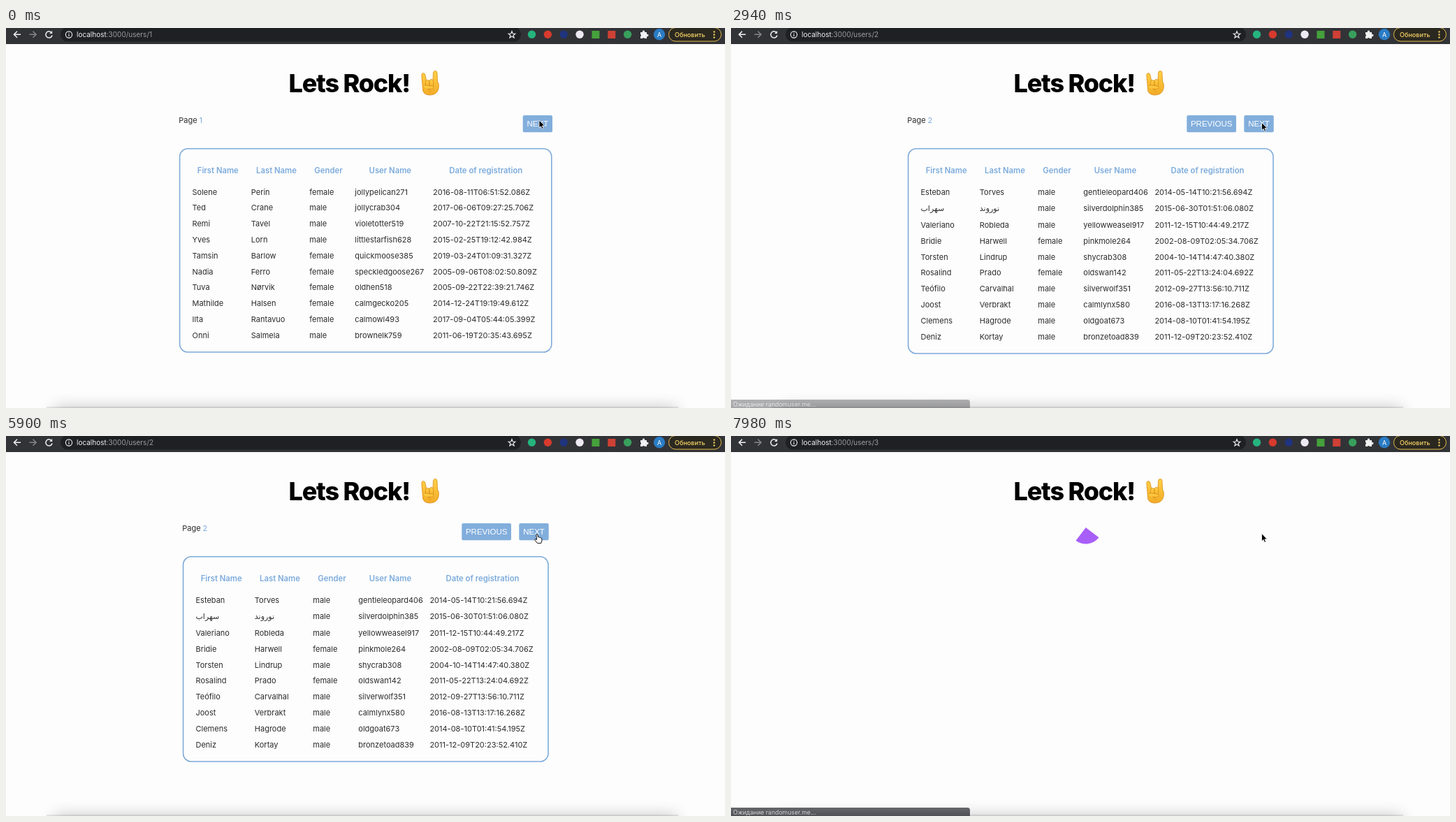
These frames come from a looping animation (1029x544 px, 8000 ms). An HTML page:

```html
<!DOCTYPE html>
<html lang="en">
<head>
<meta charset="utf-8">
<title>Users</title>
<style>
html, body { margin: 0; width: 100%; height: 100%; overflow: hidden; background: #fdfdfd; }
svg { display: block; width: 100vw; height: 100vh; }
text { font-family: Inter, "DejaVu Sans", sans-serif; font-size: 11px; fill: #2b2b2b; }
text.head { font-size: 11.3px; font-weight: 600; fill: #7cabdc; text-anchor: middle; }
text.btn { font-family: "Liberation Sans", Arial, sans-serif; font-size: 11.5px; fill: #fff; text-anchor: middle; }
text.blue { fill: #7cabdc; }
</style>
</head>
<body>
<svg viewBox="0 0 1029 544" preserveAspectRatio="none">
  <defs>
    <filter id="blur" x="-10%" y="-300%" width="120%" height="700%"><feGaussianBlur stdDeviation="11"/></filter>
    <linearGradient id="skin" x2="0" y2="1">
      <stop stop-color="#ffd145"/><stop offset="1" stop-color="#f3ac27"/>
    </linearGradient>
    <linearGradient id="bar" x2="0" y2="1">
      <stop stop-color="#66676a"/><stop offset="1" stop-color="#505154"/>
    </linearGradient>
  </defs>
  <rect width="1029" height="544" fill="#fdfdfd"/>
  <rect x="70" y="543" width="890" height="24" opacity=".22" filter="url(#blur)"/>
  <rect x="58" y="542" width="904" height="2" opacity=".09"/>

  <g id="toolbar">
    <rect width="1029" height="23" fill="#323337"/>
    <rect x="78" y="-1" width="659" height="20.5" rx="10" fill="#1f2023"/>
    <g fill="none" stroke="#f1f3f4" stroke-width="1.5">
      <path d="M21 9.3H11.5M16 4.8l-4.6 4.5 4.6 4.5"/>
      <path d="M33.5 9.3H43M38.5 4.8l4.6 4.5-4.6 4.5" stroke="#85878b"/>
      <path d="M64.8 6.2a4.6 4.6 0 1 0 1.2 4.3"/>
      <path d="M66.2 4v4h-4z" fill="#f1f3f4" stroke="none"/>
      <g stroke-width="1.1">
        <circle cx="90" cy="9.5" r="4.6"/><path d="M90 8.8v3.2M90 6.7v1.1"/>
        <path id="star"/>
      </g>
    </g>
    <text x="101" y="13" style="font-size:10px;fill:#f1f3f4">localhost<tspan id="url" fill="#9a9da1"></tspan></text>
    <g id="icons"></g>
    <path d="M908 6h3a1.7 1.7 0 1 1 3 0h3v3a1.7 1.7 0 1 1 0 3v3h-3a1.6 1.6 0 0 0-3 0h-3v-3a1.7 1.7 0 0 0 0-3z" fill="#f1f3f4"/>
    <circle cx="935" cy="9.3" r="8.2" fill="#2a7cc4"/>
    <text x="935" y="12.7" text-anchor="middle" style="font-size:9px;fill:#fff">A</text>
    <rect x="948.5" y="-.5" width="75" height="19.5" rx="9.7" fill="#2b2820" stroke="#e5bd4b"/>
    <text x="957" y="13" style="font-size:9.1px;font-weight:500;fill:#f9d566">Обновить</text>
    <path d="M1013.5 5.500v0m0 4v0m0 4v0" stroke="#f9d566" stroke-width="2.400" stroke-linecap="round"/>
  </g>

  <text x="404.5" y="92" style="font-size:36px;font-weight:800;letter-spacing:-1.2px;fill:#000">Lets Rock!</text>
  <g stroke="#d98c1c" stroke-width=".8" fill="url(#skin)" stroke-linejoin="round">
    <path d="M596 82L594.8 67.5Q595 64.5 597.4 64.6 599.5 64.7 600 67.5L602 77 611 75 611.5 64Q612 61.3 614.4 61.4 617 61.5 617 64.5L617.5 76Q620.5 81 619 87 617 95.5 607 96 598.5 96 596.7 90Z"/>
    <rect x="600.5" y="74.5" width="5.4" height="11" rx="2.7"/>
    <rect x="606" y="73.5" width="5.6" height="12" rx="2.8"/>
    <path d="M597 84Q598 81.5 601 82L610 83.2Q613 84.2 612 86.5 611 88 608 87.6L603.5 87.2Q607 89 608 92"/>
  </g>

  <g id="pages"></g>
  <path id="spinner" d="M0 0L-16.6-16.6A23.5 23.5 0 0 1 16.6-16.6Z" fill="#a85ff8"/>
  <g id="status">
    <path d="M0 532H338.5Q342 532 342 535.5V544H0Z" fill="url(#bar)"/>
    <text x="3" y="542.3" style="font-size:8.7px;fill:#d4d5d7">Ожидание randomuser.me...</text>
  </g>
  <path id="arrow" d="M0 0V11.2L2.5 8.9 4.2 12.7 6.1 11.9 4.4 8.2H7.8Z" stroke="#fff" stroke-width=".8"/>
  <path id="hand" d="M-.8 1Q.4-.5 1.5 1L2.1 4.5Q3.2 3.7 4 4.9 5.2 4.3 5.8 5.5 7.3 5.2 7.4 7V9.5L6.3 13H.9L-2.4 8.8Q-3.3 7.3-1.9 6.9L.2 8Z" fill="#fff" stroke="#111" stroke-linejoin="round"/>
</svg>
<script>
const LOOP = 8000;
const FIRST = { start: 1955, url: 2010, loaded: 2440 };
const SECOND = { start: 7502, url: 7540 };
const HAND_FROM = 5200;

const $ = id => document.getElementById(id);

function add(parent, tag, attrs, content) {
  const el = document.createElementNS('http://www.w3.org/2000/svg', tag);
  for (const k in attrs) el.setAttribute(k, attrs[k]);
  if (content) el.textContent = content;
  parent.appendChild(el);
  return el;
}

const heads = ['First Name', 'Last Name', 'Gender', 'User Name', 'Date of registration'];

const layouts = [
  {
    left: 248.6, right: 780.8, bottom: 464, tall: 0,
    cols: [266.5, 350.8, 434.3, 499.3, 611], mids: [303.3, 387, 461.5, 549.8, 686.8],
    buttons: [['NEXT', 739.7, 42.3]],
    rows: `Solene|Perin|female|jollypelican271|2016-08-11T06:51:52.086Z
Ted|Crane|male|jollycrab304|2017-06-06T09:27:25.706Z
Remi|Tavel|male|violetotter519|2007-10-22T21:15:52.757Z
Yves|Lorn|male|littlestarfish628|2015-02-25T19:12:42.984Z
Tamsin|Barlow|female|quickmoose385|2019-03-24T01:09:31.327Z
Nadia|Ferro|female|speckledgoose267|2005-09-06T08:02:50.809Z
Tuva|Nørvik|female|oldhen518|2005-09-22T22:39:21.746Z
Mathilde|Halsen|female|calmgecko205|2014-12-24T19:19:49.612Z
Ilta|Rantavuo|female|calmowl493|2017-09-04T05:44:05.399Z
Onni|Salmela|male|brownelk759|2011-06-19T20:35:43.695Z`
  },
  {
    left: 253.6, right: 776, bottom: 466, tall: 1,
    cols: [271.5, 355.8, 439.3, 504.3, 606.4], mids: [308.2, 392, 466.5, 550, 682],
    buttons: [['PREVIOUS', 652.3, 70.7], ['NEXT', 734.3, 42.4]],
    rows: `Esteban|Torves|male|gentleleopard406|2014-05-14T10:21:56.694Z
سهراب|نوروند|male|silverdolphin385|2015-06-30T01:51:06.080Z
Valeriano|Robleda|male|yellowweasel917|2011-12-15T10:44:49.217Z
Bridie|Harwell|female|pinkmole264|2002-08-09T02:05:34.706Z
Torsten|Lindrup|male|shycrab308|2004-10-14T14:47:40.380Z
Rosalind|Prado|female|oldswan142|2011-05-22T13:24:04.692Z
Teófilo|Carvalhal|male|silverwolf351|2012-09-27T13:56:10.711Z
Joost|Verbrakt|male|calmlynx580|2016-08-13T13:17:16.268Z
Clemens|Hagrode|male|oldgoat673|2014-08-10T01:41:54.195Z
Deniz|Kortay|male|bronzetoad839|2011-12-09T20:23:52.410Z`
  }
];

function buildPage(p, i) {
  const g = add($('pages'), 'g', {});
  add(g, 'text', { x: p.left - 1.3, y: 135.6 }, 'Page');
  add(g, 'text', { x: p.left + 28, y: 135.6, class: 'blue' }, String(i + 1));
  for (const [label, x, width] of p.buttons) {
    add(g, 'rect', { x, y: 125, width, height: 24.2, rx: 2, fill: '#82aedc' });
    add(g, 'text', { x: x + width / 2, y: 140.6, class: 'btn' }, label);
  }
  add(g, 'rect', {
    x: p.left, y: 172.7, width: p.right - p.left, height: p.bottom - 172.7,
    rx: 11.5, fill: 'none', stroke: '#7fabda', 'stroke-width': 1.6
  });
  heads.forEach((h, c) => add(g, 'text', { x: p.mids[c], y: 208.3, class: 'head' }, h));
  p.rows.split('\n').forEach((row, r) => {
    const extra = p.tall * (r > 1 ? 1.8 : r * 0.9);
    row.split('|').forEach((cell, c) =>
      add(g, 'text', { x: p.cols[c], y: 238.5 + r * 22.83 + extra }, cell));
  });
  return g;
}

const pages = layouts.map(buildPage);

const points = Array.from({ length: 10 }, (_, i) => {
  const a = i * Math.PI / 5 - Math.PI / 2, r = i % 2 ? 2.2 : 5.2;
  return [724 + r * Math.cos(a), 9.8 + r * Math.sin(a)].map(v => v.toFixed(1));
});
$('star').setAttribute('d', 'M' + points.join('L') + 'Z');

['#25b47e', '#d83a2e', '#20347f', '#eeeaf5', '#45a13c', '#cf4036', '#38a05c'].forEach((fill, i) => {
  const x = 752.5 + i * 22.85;
  if (i === 4 || i === 5) add($('icons'), 'rect', { x: x - 5.5, y: 4, width: 11, height: 11, fill });
  else add($('icons'), 'circle', { cx: x, cy: 9.3, r: 5.7, fill });
});

const ramp = (t, a, b) => Math.min(1, Math.max(0, (t - a) / (b - a)));
const ease = u => u * u * (3 - 2 * u);
const show = (el, on) => { el.style.display = on ? '' : 'none'; };

function draw(t) {
  const first = t >= FIRST.start && t < FIRST.loaded;
  const second = t >= SECOND.start;
  show(pages[0], t < FIRST.start);
  show(pages[1], t >= FIRST.loaded && !second);

  show($('spinner'), first || second);
  const angle = (t - (second ? SECOND.start : FIRST.start)) * 0.36;
  $('spinner').setAttribute('transform', `translate(507.8 131) rotate(${angle})`);

  const page = t < FIRST.url ? 1 : t < SECOND.url ? 2 : 3;
  $('url').textContent = ':3000/users/' + page;

  const fade = ramp(t, 2080, 2200) - ramp(t, 2690, 3190) + ramp(t, 7600, 7720);
  $('status').setAttribute('opacity', fade);

  const drift = ease(ramp(t, 1000, 1500));
  const drop = ease(ramp(t, 4950, 5400));
  const x = 763 - 3.5 * drift;
  const y = 131.8 + 3.6 * drift + 5 * drop - 0.8 * ramp(t, 6000, 6600);
  const hand = t >= HAND_FROM && !second;
  show($('hand'), hand);
  show($('arrow'), !hand);
  $(hand ? 'hand' : 'arrow').setAttribute('transform', `translate(${x} ${y})`);
}

const start = performance.now();
function tick() {
  draw((performance.now() - start) % LOOP);
  requestAnimationFrame(tick);
}
tick();
</script>
</body>
</html>
```
